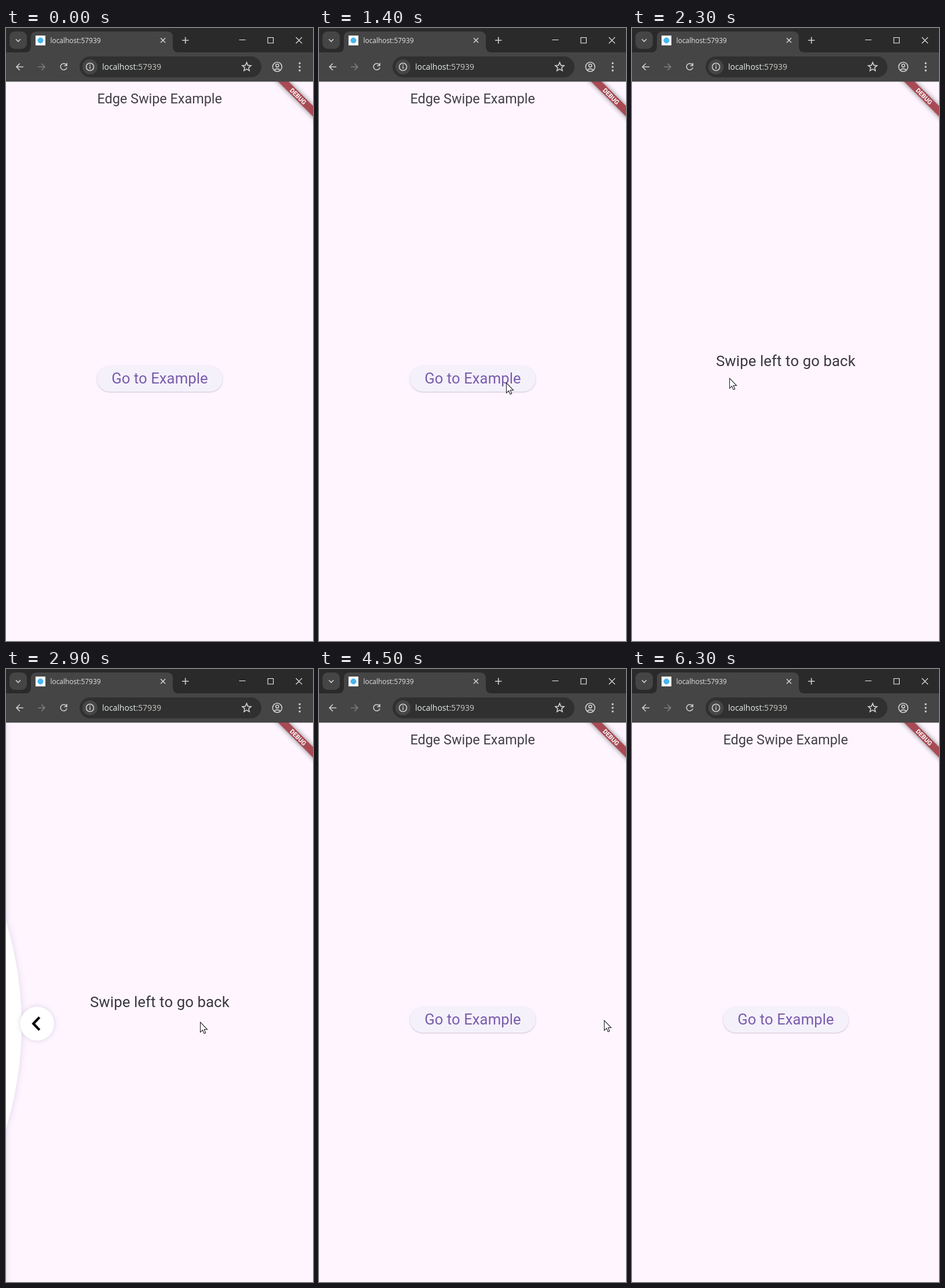
Recreate the animation shown at these times as an HTML page. Size 530 by 1057 pixels, loop 6400 ms.

```html
<!DOCTYPE html>
<html lang="en">
<head>
<meta charset="utf-8">
<title>Edge Swipe Example</title>
<style>
  html, body { margin: 0; width: 100%; height: 100%; overflow: hidden; background: #fef5ff; }
  svg { display: block; width: 530px; height: 1057px; }
  .app { font-family: Roboto, sans-serif; text-anchor: middle; }
  .ui { font-family: "Open Sans", "Noto Sans", sans-serif; }
  .icon { fill: none; stroke: #d0d0d0; stroke-width: 1.6; }
  .thin { stroke: #f0f0f0; stroke-width: 1.1; }
  .off { stroke: #7d7d7d; }
  .hover { fill: #5b5b5b; }
  #bulge { filter: drop-shadow(0 0 6px rgba(58, 48, 100, .16)); }
  #bubble circle { filter: drop-shadow(0 0 4px rgba(58, 48, 100, .18)); }
  #button { filter: drop-shadow(0 1px 1px rgba(40, 30, 60, .24)); }
  #band { filter: drop-shadow(0 0 4px rgba(0, 0, 0, .5)); }
</style>
</head>
<body>
<svg viewBox="0 0 530 1057">
  <rect width="530" height="1057" fill="#fef5ff"/>

  <g class="app">
    <g id="home">
      <text x="265.2" y="129.6" font-size="23.4" fill="#423f46">Edge Swipe Example</text>
      <rect id="button" x="157" y="582.5" width="217" height="44.5" rx="22.2" fill="#f4f1fa"/>
      <text x="265.4" y="613" font-size="25.6" letter-spacing=".1" fill="#7a5bae">Go to Example</text>
    </g>
    <g id="detail">
      <rect y="92" width="530" height="965" fill="#fef5ff"/>
      <text x="265.4" y="582.9" font-size="25.7" letter-spacing=".12" fill="#3a373e">Swipe left to go back</text>
    </g>
  </g>

  <g id="drawer">
    <path id="bulge" fill="#fff"/>
    <g id="bubble">
      <circle r="29.3" fill="#fff"/>
      <path d="M4-11-6.5 0 4 11" fill="none" stroke="#0a0a0a" stroke-width="4.2"/>
    </g>
  </g>

  <g transform="translate(530 92) rotate(45)" class="app">
    <rect id="band" x="-60" y="30" width="120" height="12.8" fill="#a84a54"/>
    <text y="40.3" font-size="10.9" font-weight="700" fill="#fff">DEBUG</text>
  </g>

  <g class="ui">
    <rect width="530" height="43" fill="#2a2a2a"/>
    <rect y="42" width="530" height="50.5" fill="#454545"/>
    <path d="M33 42q10 0 10-10V16q0-10 10-10H278q10 0 10 10V32q0 10 10 10z" fill="#454545"/>
    <rect x="6" y="6" width="30" height="30" rx="9" fill="#454545"/>
    <path class="icon" d="M17 19.3l4 4 4-4"/>
    <rect x="51" y="13" width="17" height="17" fill="#fff"/>
    <circle cx="59.5" cy="21.5" r="5" fill="#47b5ee"/>
    <text x="76.5" y="26" font-size="11.9" fill="#e4e4e4">localhost:57939</text>
    <path class="icon" d="M267 17.3l8 8m0-8l-8 8M304 21.2h11.4M309.7 15.5v11.4"/>
    <path class="icon thin" d="M402.5 20.5h11M452 16.5h9.5v9.5h-9.5zM500.5 16l10.5 10.5m0-10.5l-10.5 10.5"/>

    <path class="icon" d="M30 67H18m5.8-5.8L18 67l5.8 5.8"/>
    <path class="icon off" d="M55 67h12m-5.8-5.8L67 67l-5.8 5.8"/>
    <path class="icon" d="M104.3 63.8a5.5 5.5 0 1 0 .7 4.3M105 60.5v4.5h-4.5"/>
    <rect x="127" y="49" width="314" height="36" rx="18" fill="#303030"/>
    <circle cx="145" cy="67" r="13" fill="#464646"/>
    <circle class="icon" cx="145" cy="67" r="6.5"/>
    <path class="icon" d="M145 66v4.6M145 63.1v1.7"/>
    <text x="166" y="72" font-size="13.95" fill="#e6ecec">localhost<tspan fill="#cdcbc8">:57939</tspan></text>
    <path id="star" class="icon"/>
    <circle class="hover" cx="507" cy="67" r="17"/>
    <circle class="hover" cx="468" cy="67" r="17"/>
    <circle class="icon" cx="468.3" cy="67" r="8"/>
    <circle class="icon" cx="468.3" cy="64.8" r="2.6"/>
    <path class="icon" d="M462.8 72.7q5.5-4.5 11 0"/>
    <path d="M507 60.8v0m0 6.2v0m0 6.2v0" stroke="#d0d0d0" stroke-width="3.4" stroke-linecap="round"/>
  </g>

  <path id="cursor" d="M.5 0V17.3L4.5 13.5 7 19.6 9.7 18.5 7.2 12.5H12.5Z" fill="#fff" stroke="#25232a" stroke-width="1.1"/>
</svg>
<script>
const LOOP = 6400, STEP = 100;
const OPEN = 1600, DRAG = 2300, RELEASE = 4000;
const $ = s => document.querySelector(s);
const clamp = v => Math.min(1, Math.max(0, v));
const easeOut = k => 1 - (1 - clamp(k)) ** 1.8;

// Pointer stops: ms, x, y
const stops = [
  [100, 524, 585], [600, 462, 614], [900, 461, 615], [1400, 323, 612], [1800, 322.5, 610],
  [2300, 168, 604], [2900, 335, 609], [3600, 476.5, 612], [3900, 494, 612],
  [5100, 490, 600], [5300, 512.5, 301], [5700, 512, 106], [5900, 466, 62]
];

function pointerAt(t) {
  const i = stops.findIndex(s => s[0] > t);
  if (i < 1) return stops.at(i).slice(1);
  const [t0, x0, y0] = stops[i - 1], [t1, x1, y1] = stops[i];
  const k = (t - t0) / (t1 - t0);
  return [x0 + (x1 - x0) * k, y0 + (y1 - y0) * k];
}

function show(el, opacity) {
  el.style.opacity = opacity;
  el.style.display = opacity > 0 ? '' : 'none';
}

function move(el, x, y) {
  el.setAttribute('transform', `translate(${x} ${y})`);
}

function zoom(el, scale, opacity) {
  el.setAttribute('transform',
    `translate(265 574.5) scale(${scale}) translate(-265 -574.5)`);
  show(el, opacity);
}

function starPath(cx, cy, outer, inner) {
  const points = Array.from({ length: 10 }, (_, i) => {
    const r = i % 2 ? inner : outer, a = i * Math.PI / 5 - Math.PI / 2;
    return [cx + r * Math.cos(a), cy + r * Math.sin(a)];
  });
  return `M${points.join('L')}Z`;
}

const home = $('#home'), detail = $('#detail'), drawer = $('#drawer');
const bulge = $('#bulge'), bubble = $('#bubble'), cursor = $('#cursor');
const hovers = document.querySelectorAll('.hover');
$('#star').setAttribute('d', starPath(415.5, 67.3, 7.9, 3.6));

// The drawer swells from the left edge as the pointer drags right.
function drawDrawer(x, y, opacity) {
  const pull = Math.max(0, x - 175);
  show(drawer, opacity * clamp(pull / 30));
  const depth = pull * .169, half = 164 + depth * .55, mid = y + 4.5;
  bulge.setAttribute('d',
    `M-80 40H0V${mid - half}Q${depth * 2} ${mid} 0 ${mid + half}V1110H-80Z`);
  move(bubble, 76 - 110 * Math.exp(-pull / 100), y + 2.5);
}

function draw(t) {
  const [x, y] = pointerAt(t);
  const opened = easeOut((t - OPEN) / 400) - easeOut((t - RELEASE) / 300);
  const visible = clamp(opened * 1.4);
  zoom(home, 1 + .05 * opened, 1 - .25 * opened);
  zoom(detail, .85 + .15 * opened, visible);
  drawDrawer(x, y, t > DRAG ? visible : 0);

  const present = t >= 100 && t < 6000;
  move(cursor, x, y);
  show(cursor, present ? 1 : 0);
  for (const h of hovers) {
    const near = Math.hypot(x - h.cx.baseVal.value, y - h.cy.baseVal.value) < 17;
    show(h, present && near ? 1 : 0);
  }
}

// The picture advances in whole steps, like a screen recording.
let start;
function tick(now) {
  start ??= now;
  draw(Math.floor(((now - start) % LOOP) / STEP) * STEP);
  requestAnimationFrame(tick);
}
draw(0);
requestAnimationFrame(tick);
</script>
</body>
</html>
```
